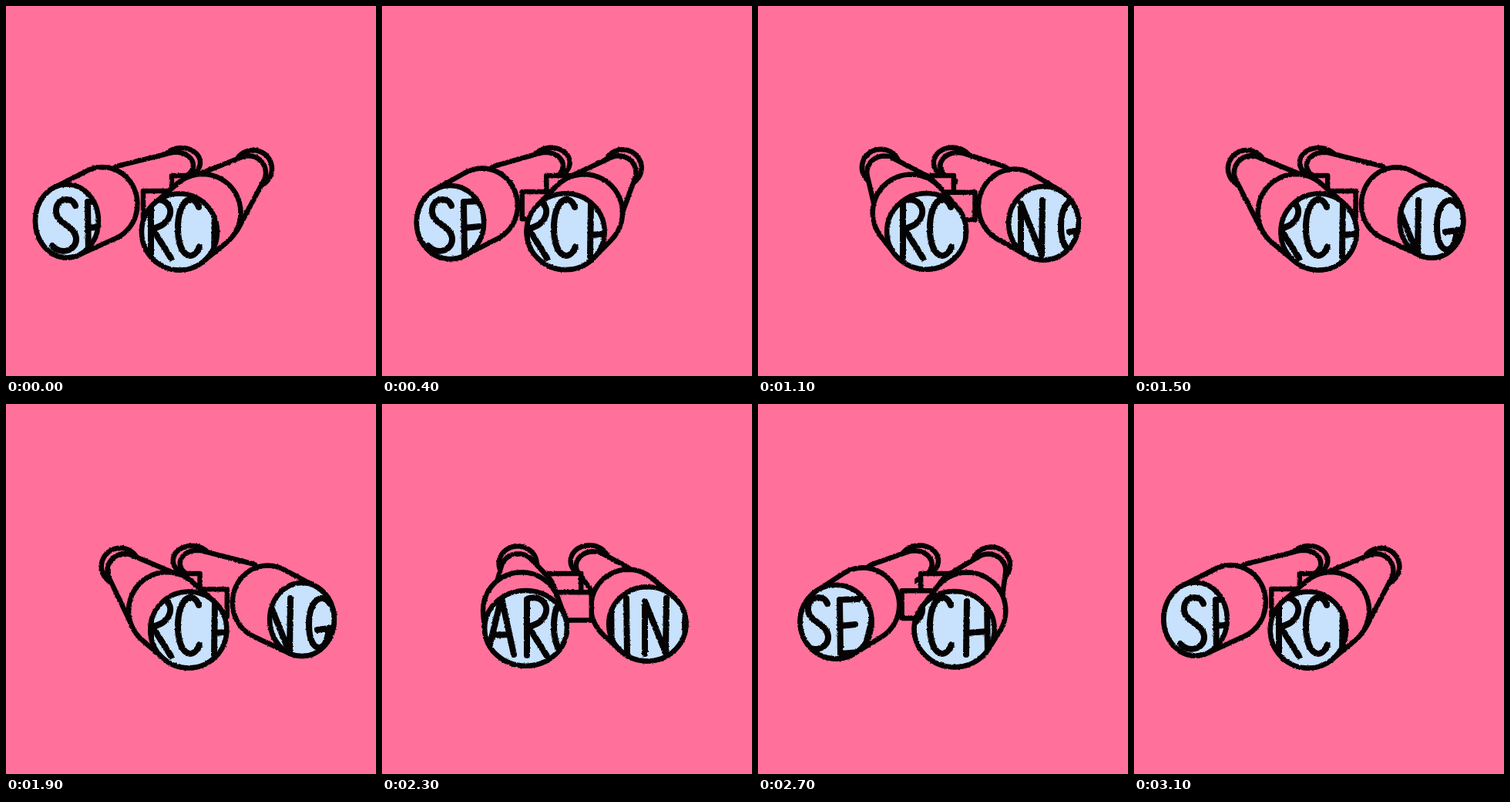
An HTML page with a canvas for the animation above (3.2 s loop, 480 by 480 pixels).

```html
<!DOCTYPE html>
<html lang="en">
<head>
<meta charset="utf-8">
<title>Searching</title>
<style>
  html, body { margin: 0; width: 100%; height: 100%; overflow: hidden; background: #ff719b; }
  canvas { display: block; width: 480px; height: 480px; filter: url(#crayon); }
  svg { position: absolute; width: 0; height: 0; }
</style>
</head>
<body>
<canvas id="stage" width="480" height="480"></canvas>
<svg aria-hidden="true">
  <filter id="crayon" x="0" y="0" width="100%" height="100%" color-interpolation-filters="sRGB">
    <feTurbulence type="fractalNoise" baseFrequency=".35" numOctaves="2" seed="4"/>
    <feDisplacementMap in="SourceGraphic" scale="2.5" xChannelSelector="R" yChannelSelector="G"/>
  </filter>
</svg>
<script>
const ctx = document.getElementById('stage').getContext('2d');
const PINK = '#ff719b', BLUE = '#c8e1fc', INK = '#050304';
const STEP = 100, STEPS = 32, MIRROR = 466;

// Turn of the binoculars (-1 left, 1 right) at some steps of the outward sweep.
const sweep = [[0, -1], [2, -.98], [4, -.86], [5, -.68], [6, -.6], [8, -.09], [9, .4], [12, .94], [16, 1]];

// The word SEARCHING, fixed behind the moving lenses.
const word = new Path2D([
  'M90 259C85 246 64 249 65 267C66 283 89 284 91 301C92 319 69 323 60 311',
  'M130 253L106 254L107 324L131 322M107 288L126 286',
  'M137 324L155 251L171 325M143 300L166 299',
  'M188 326L188 253C207 246 218 262 211 275C207 284 197 287 190 289L214 327',
  'M250 261C244 243 225 248 223 284C222 326 243 334 251 312',
  'M271 256L270 325M297 253L298 325M271 297L297 295',
  'M317 252L318 325',
  'M341 324L341 256L368 323L369 252',
  'M420 259C410 243 393 255 393 286C393 326 418 324 418 292M404 293L426 290'
].join(''));

function turnAt(step) {
  const u = Math.min(step, STEPS - step);
  const i = Math.max(1, sweep.findIndex(([at]) => at >= u));
  const [[u0, a], [u1, b]] = [sweep[i - 1], sweep[i]];
  return a + (b - a) * (u - u0) / (u1 - u0);
}

// Ellipses [cx, cy, rx, ry] of the left barrel; the right one is its mirror image at -s.
function barrelShape(s) {
  const q = s * s;
  const eye = [186.5 - 41 * s * Math.sqrt(Math.abs(s)), 205 + 4 * s + 2 * q, 24.5, 21.5 + 2.5 * s];
  const ridge = [163 + 43 * s + 5 * q, 266 + 5.5 * s - 3.5 * q, 49.5 + 2 * s - 2 * q, 49 + s];
  const lens = [153 + 81 * s + 7 * q, 288.5 + 7 * s - 2.5 * q, 53 + 4 * s - 8 * q, 48.5 + s];
  const girth = 35 + 15 * s - 3 * q;
  const root = [174 + 27 * s + 4 * q, 243 + 20.5 * s + q, girth, girth];
  const dx = ridge[0] - eye[0], dy = ridge[1] - eye[1], d = Math.hypot(dx, dy);
  const neck = [eye[0] + 8 * dx / d, eye[1] + 8 * dy / d, eye[2] - 2, eye[3] - 2];
  return { eye, neck, root, ridge, lens };
}

function ellipsePoints([cx, cy, rx, ry]) {
  return Array.from({ length: 48 }, (_, i) => {
    const a = i * Math.PI / 24;
    return [cx + rx * Math.cos(a), cy + ry * Math.sin(a)];
  });
}

function halfHull(points) {
  const chain = [];
  for (const p of points) {
    while (chain.length > 1) {
      const [a, b] = chain.slice(-2);
      if ((b[0] - a[0]) * (p[1] - a[1]) - (b[1] - a[1]) * (p[0] - a[0]) > 0) break;
      chain.pop();
    }
    chain.push(p);
  }
  return chain.slice(0, -1);
}

function polygon(points) {
  const path = new Path2D();
  points.forEach(p => path.lineTo(...p));
  path.closePath();
  return path;
}

// Outline of a band stretched around two ellipses.
function sleeve(a, b) {
  const points = [...ellipsePoints(a), ...ellipsePoints(b)]
    .sort((p, q) => p[0] - q[0] || p[1] - q[1]);
  return polygon([...halfHull(points), ...halfHull(points.reverse())]);
}

function paint(path, fill = PINK) {
  ctx.fillStyle = fill;
  ctx.fill(path);
  ctx.stroke(path);
}

function mirrorIf(flipped) {
  if (flipped) ctx.transform(-1, 0, 0, 1, MIRROR, 0);
}

// The inner edge of a tube that points away melts into the bridge.
function drawTube(neck, root, pointsAway) {
  const tube = sleeve(neck, root);
  ctx.fillStyle = PINK;
  ctx.fill(tube);
  ctx.save();
  if (pointsAway) {
    const [nx, ny] = neck, [rx, ry] = root;
    ctx.clip(polygon([[0, 0], [480, 0], [480, 480], [nx, 480], [nx, ny], [rx, ry], [0, ry]]));
  }
  ctx.stroke(tube);
  ctx.restore();
}

function drawBarrel(s, flipped) {
  const { eye, neck, root, ridge, lens } = barrelShape(s);
  ctx.save();
  mirrorIf(flipped);
  paint(sleeve(eye, neck));
  drawTube(neck, root, s < -.5);
  paint(sleeve(ridge, lens));

  const glass = new Path2D();
  glass.ellipse(...lens, 0, 0, Math.PI * 2);
  paint(glass, BLUE);
  ctx.clip(glass);
  mirrorIf(flipped);
  ctx.lineWidth = 8;
  ctx.stroke(word);
  ctx.restore();
}

function drawBridge(s, flipped) {
  const top = 247 + 7 * s;
  ctx.save();
  mirrorIf(flipped);
  for (const [x, y, bottom] of [[203 - 12 * s, 220, top], [205 + 27 * s, top, 284 + 9 * s]]) {
    const box = new Path2D();
    box.rect(x, y, 48, bottom - y);
    paint(box);
  }
  ctx.restore();
}

function frame(now) {
  const turn = turnAt(Math.floor(now / STEP) % STEPS);
  const away = -Math.abs(turn), flipped = turn > 0;
  ctx.clearRect(0, 0, 480, 480);
  ctx.strokeStyle = INK;
  ctx.lineWidth = 6.5;
  ctx.lineCap = ctx.lineJoin = 'round';
  drawBarrel(away, flipped);
  drawBridge(away, flipped);
  drawBarrel(-away, !flipped);
  requestAnimationFrame(frame);
}
frame(0);
</script>
</body>
</html>
```
